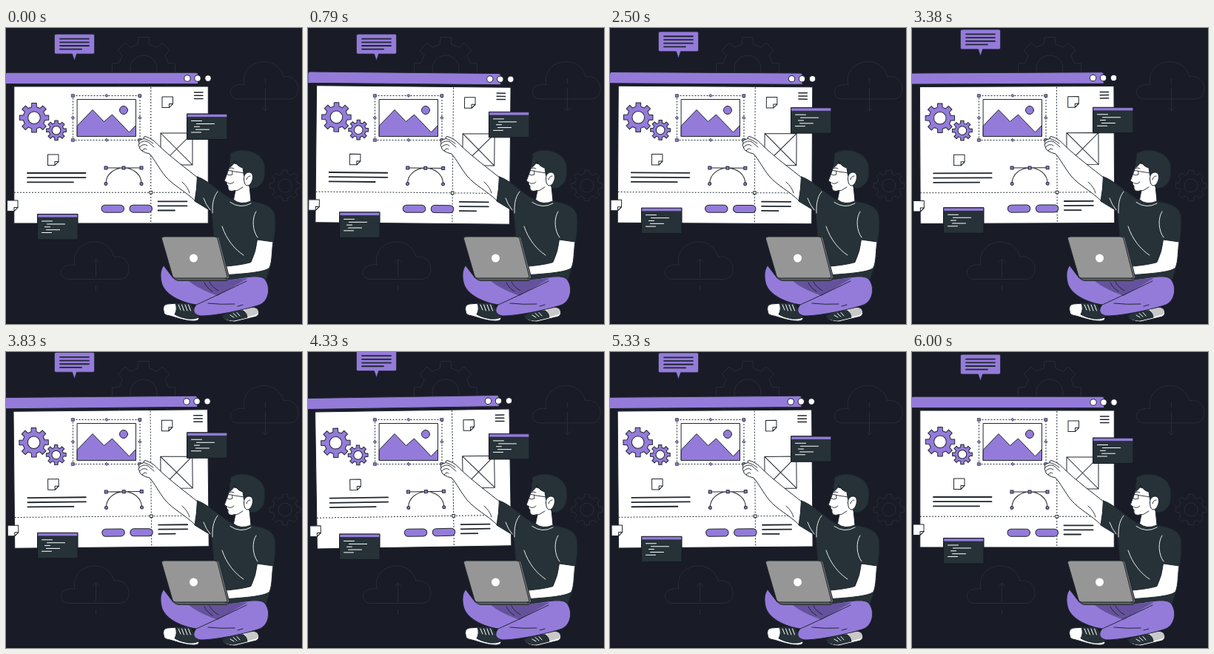
Animation of 400x400 px, one loop 6040 ms. Source, as an HTML page:

```html
<!DOCTYPE html>
<html lang="en">
<head>
<meta charset="utf-8">
<title>Designer at work</title>
<style>
  html, body { margin: 0; width: 100%; height: 100%; overflow: hidden; background: #191b27; }
  svg { display: block; width: 100vw; height: 100vh; }
  .back { fill: none; stroke: #2a2d38; }
  .ink { stroke: #20272e; stroke-linejoin: round; stroke-linecap: round; }
  .line { fill: none; stroke: #20272e; stroke-linejoin: round; stroke-linecap: round; }
  .thick { stroke-width: 1.8; }
  .purple { fill: #947bda; }
  .white { fill: #fff; }
  .dark { fill: #263238; }
  .light { fill: none; stroke: #fff; stroke-linecap: round; }
  .dots { fill: none; stroke: #263238; stroke-dasharray: 2 2; }
</style>
</head>
<body>
<svg viewBox="0 0 400 400">
  <defs>
    <g id="cloud">
      <path d="M313 96C300 95 300 79 313 77Q318 75 322 77C318 59 331 45.500 349 45.500C362 45.500 372 54 375 66C387 63 396 73 395 84C394 92 389 96 382 96Z"/>
    </g>
    <g id="note" class="ink">
      <path class="white" d="M0 0H14.500V9.500L9.500 14.500H0Z"/>
      <path class="white" d="M14.500 9.500H9.500V14.500Z"/>
    </g>
    <g id="code">
      <path class="dark" stroke="#141920" d="M0 0H54.500V34.500H0Z"/>
      <path class="purple" stroke="#20272e" stroke-width=".7" d="M.3 .4H54.200V4.600H.3Z"/>
      <path class="light" d="M6 9.500H20M13 13.500H37M10 17.300H17M12 21.200H30M6 25H19"/>
    </g>
  </defs>

  <g class="back">
    <path data-gear="186 55 43 34 18"/>
    <path data-gear="377 213 21 16.500 9"/>
    <use href="#cloud"/>
    <path d="M350.500 68V75M350.500 81V112M346 107.500L350.500 112L355 107.500"/>
    <use href="#cloud" x="-229" y="243.500"/>
    <path d="M121.500 355V348M121.500 337V312M117 316.500L121.500 312L126 316.500"/>
  </g>
  <path d="M0 398.500H400" stroke="#12141c"/>

  <g id="bubble">
    <path class="ink purple" stroke-width=".7" d="M67.500 8.300H117.500Q119.500 8.300 119.500 10.300V33Q119.500 35 117.500 35H95.500L92.500 44L89.500 35H67.500Q65.500 35 65.500 33V10.300Q65.500 8.300 67.500 8.300Z"/>
    <path class="line thick" d="M73 14.600H112M73 19.300H112M73 24H112M73 28.700H102"/>
  </g>

  <g id="board">
    <path class="purple ink" d="M-1 75.500V63Q-1 60.300 2 60.300H256.500Q259.500 60.300 259.500 63V75.500Z"/>
    <g class="white ink">
      <circle cx="245" cy="68" r="4.200"/>
      <circle cx="259" cy="68" r="4.200"/>
      <circle cx="273" cy="68" r="4.200"/>
    </g>
    <path class="white ink" d="M10.800 79H273.300V264H10.800Z"/>
    <path class="dots" d="M11 222.300H273M195.800 80V264"/>
    <path class="white ink" d="M194 220.500H197.600V224.100H194Z"/>
    <path class="line" stroke-width="1.500" d="M254.500 87H266M254.500 91.200H266M254.500 95.400H266"/>
    <path class="line thick" d="M29 196H107.500M29 202.200H107.500M29 208.400H91M205.500 234.300H244.500M205.500 240.400H244.500M205.500 246.500H228"/>
    <path class="purple ink" data-gear="38 121.300 20 15 8.300"/>
    <path class="purple ink" data-gear="68 138.300 13.600 10 5.800"/>
    <use href="#note" x="211" y="93"/>
    <use href="#note" x="56.500" y="171"/>
    <use href="#note" x="1.500" y="233"/>
    <rect class="purple ink" x="129" y="239.200" width="30.500" height="10" rx="5"/>
    <rect class="purple ink" x="167" y="239.200" width="30.500" height="10" rx="5"/>
    <path class="line" d="M209 142H252V185H209ZL252 185M252 142L209 185"/>
    <path class="line" d="M135 189H183M135 210C135 198 146 189 159 189S183 198 183 210"/>
    <g class="purple ink">
      <path d="M133 187H137V191H133ZM157 187H161V191H157ZM181 187H185V191H181Z"/>
      <circle cx="135" cy="210.500" r="2"/>
      <circle cx="183" cy="210.500" r="2"/>
    </g>
  </g>

  <path class="white" d="M90.500 91.500H181V151.500H90.500Z"/>
  <path class="dots" d="M90.500 91.500H181V151.500H90.500Z"/>
  <path class="white ink" d="M96.500 96.500H175.500V146.500H96.500Z"/>
  <path class="purple ink" d="M96.500 132L117 110.500L132.500 126.500L143.500 117L166.500 141L175.500 131.500V146.500H96.500Z"/>
  <circle class="purple ink" cx="159" cy="111" r="5.500"/>
  <path id="handles" class="purple ink" stroke-width=".8"/>

  <g class="float"><use href="#code" x="244.500" y="116"/></g>
  <g class="float"><use href="#code" x="42.500" y="251.500"/></g>

  <!-- raised arm -->
  <path class="white ink" d="M260 203C245 191 222 174 204.500 157C201 153 196 149 188 146.500Q185 147 186.500 149.500L182 151Q178 153 180 156Q178 158.500 180.500 161Q180 164 184 166Q188 169 194 170C201 178 207 190 215 200C226 213 242 220 256 234Z"/>
  <path class="line" stroke-width=".9" d="M186.500 149.500Q193 151 199 156M180 156Q186 151 192 154L200 161M180.500 161Q186 155 191 159M184 166Q187 161 190 164M238 208Q246 215 248 223"/>

  <!-- shoes -->
  <path class="white ink" d="M213 383Q211 374 218 373L231 372L247 378L261 391Q261 396 254 396C240 396 228 390 217 388Q213 387 213 383Z"/>
  <path class="dark ink" d="M229 372H249L261 391Q254 394 246 393Q234 391 228 387Q232 380 229 372Z"/>
  <path class="light" d="M233 374L236 381M237.500 374L240.500 382M242 374L245 382M246.500 374L249.500 382"/>
  <path class="white ink" d="M292 389L306 382L330 378Q340 376 341.500 384Q342 390 334 391L309 397Q297 397 292 389Z"/>
  <path fill="#c8c9c8" d="M322 381Q338 374 341 383Q341 387 336 388L325 391Z"/>
  <path class="dark ink" d="M292 389L306 381L321 382Q326 386 326 391L309 395Q298 396 292 389Z"/>
  <path class="light" d="M303 388L308 391M307 385.500L312 390M312 384.500L316 389"/>

  <!-- body -->
  <path class="dark ink" d="M258.500 201C272 205 290 223 304 231Q318 240 331 234C346 237 360 240 363 252C365 267 363 278 361.500 289L358 320L351 341L297 340L281 283L278 248L255 234Q258 218 258.500 201Z"/>
  <path class="purple ink" d="M213 321L226 338L301 340C318 338 340 333 348 338C358 346 357 368 343 374C326 380 285 389 263 389C256 388 250 383 257 374C237 371 213 360 210 343C208 334 209 326 213 321Z"/>
  <path fill="#65529c" d="M245 340H301L327 338C315 345 301 353 286 362C273 357 257 351 245 340Z"/>
  <path class="line" d="M257 374C271 368 300 354 325 342M268 344Q271 351 279 356M275 343Q278 350 287 355M273 372Q290 374 309 373M313 376L320 374"/>
  <path class="white ink" d="M339.500 286L361 289C359 300 360 315 356 324C350 330 322 332 300 333.500L297 322C310 321 323 319 331 316.500Q338 302 339.500 286Z"/>
  <path class="light" stroke-width=".9" d="M303 235.500Q317 245 331 237M286 221C279 230 279 240 279 250M267 230Q270 239 276 246M338 248C332 257 333 274 340 283M292 268C298 286 309 299 321 307"/>

  <!-- laptop -->
  <path fill="#5d5e60" class="ink" d="M226 337L300 335L301 339Q300 341.500 297 341.500H233Q228 341 226 337Z"/>
  <path fill="#747577" class="ink" d="M284 282Q287 281.500 288 284L302 338L297 339Z"/>
  <path fill="#969696" class="ink" d="M213 282H282Q285 282 286 285L299 336Q299 338 296 338H229Q226 338 225 335L210.500 285Q210 282 213 282Z"/>
  <circle class="white" cx="253.500" cy="311" r="5.500"/>

  <!-- head -->
  <path class="white ink" d="M304 182L300.500 192L295.500 205.500Q295 208 298.500 208.500L298 211L300 213.500Q299 220 305 220.500L310 219.500L307.500 232Q317 240 331 234L329 213L334 190Z"/>
  <path class="dark ink" d="M303 188Q301 180 304 174Q301 169 307 168C316 163 335 165 344 175Q351 183 349.500 194Q350 208 342 213Q337 218 330 216L327 211L321.500 199L320 189Q312 187 309 179Q308 185 303 188Z"/>
  <path class="white ink" d="M321.500 204C321 197 327 193 331.500 196C336 200 332 212 327 213Q322 214 321.500 204Z"/>
  <path class="line" stroke-width=".9" d="M325 205Q326 200 330 200M300 209.500Q304 212 308 208M307 221Q314 220 320 215M302 189.500Q305 188 308 190M299 192.500L305.500 193L306 198Q302 200 299 198ZM305.500 193.500L322 196"/>
</svg>
<script>
  const LOOP = 6040, CYCLE = 6000, DELAY = 1500;
  const $ = id => document.getElementById(id);

  // Cog outline with eight teeth and a round hole
  function gear(x, y, outer, inner, hole) {
    const points = [];
    for (let i = 0; i < 8; i++) {
      for (const [offset, r] of [[-.29, inner], [-.21, outer], [.21, outer], [.29, inner]]) {
        const a = (i + offset) * Math.PI / 4;
        points.push((x + r * Math.sin(a)).toFixed(2) + ' ' + (y - r * Math.cos(a)).toFixed(2));
      }
    }
    return `M${points.join('L')}ZM${x - hole} ${y}a${hole} ${hole} 0 1 0 ${2 * hole} 0a${hole} ${hole} 0 1 0 ${-2 * hole} 0Z`;
  }
  for (const el of document.querySelectorAll('[data-gear]')) {
    el.setAttribute('d', gear(...el.dataset.gear.split(' ').map(Number)));
    el.setAttribute('fill-rule', 'evenodd');
  }

  const square = (x, y) => `M${x - 1.8} ${y - 1.8}h3.600v3.600h-3.600Z`;
  const diamond = (x, y) => `M${x} ${y - 2}l2 2l-2 2l-2 -2Z`;
  $('handles').setAttribute('d', [90.5, 181].map(x =>
    square(x, 91.5) + square(x, 151.5) + diamond(x, 121.5)).join('') +
    diamond(136, 91.5) + diamond(136, 151.5));

  // Triangle waves: up 10 px and back, and one degree either way
  const lift = t => t < 0 ? 0 : -10 * (1 - Math.abs(1 - 2 * (t / CYCLE % 1)));
  const tilt = t => 1 - Math.abs(2 - 4 * ((t / CYCLE + .25) % 1));
  const floats = document.querySelectorAll('.float');

  function draw() {
    const t = performance.now() % LOOP;
    $('board').setAttribute('transform', `rotate(${tilt(t)} 136 162)`);
    $('bubble').setAttribute('transform', `translate(0 ${lift(t - DELAY)})`);
    for (const el of floats) el.setAttribute('transform', `translate(0 ${lift(t)})`);
    requestAnimationFrame(draw);
  }
  draw();
</script>
</body>
</html>
```
